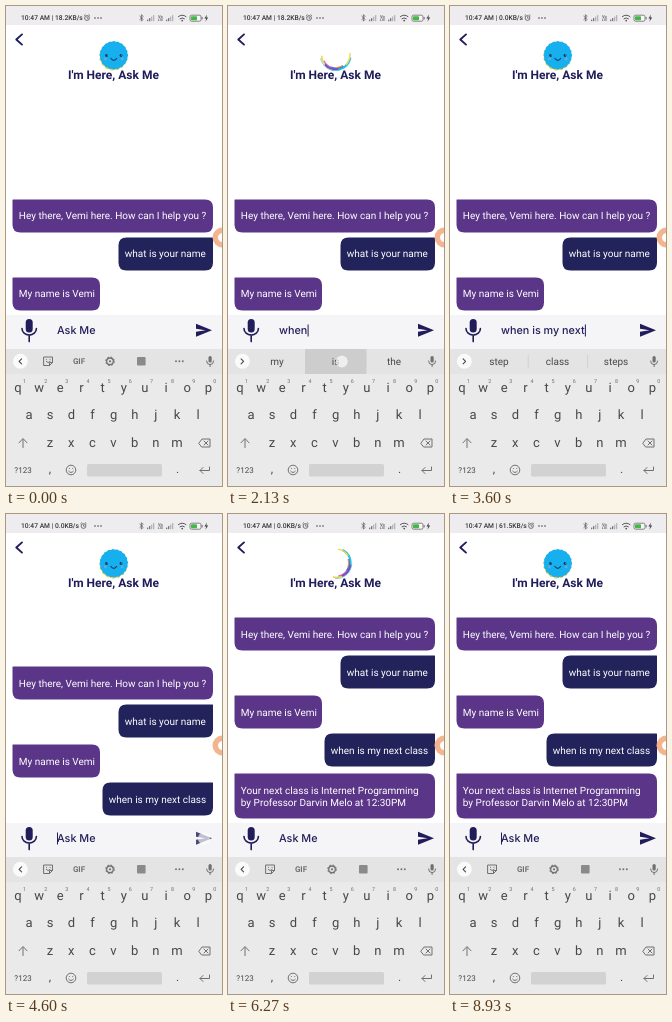
An HTML page that plays this animation: 216x480 px, repeating every 8.99 s.

```html
<!DOCTYPE html>
<html lang="en">
<head>
<meta charset="utf-8">
<title>Chat assistant</title>
<style>
  html, body { margin: 0; width: 100%; height: 100%; overflow: hidden; background: #fff; }
  svg { display: block; width: 100vw; height: 100vh; }
  text { font-family: Roboto, "Noto Sans", sans-serif; text-rendering: geometricPrecision; white-space: pre; }
  .field { font: 500 10.8px Inter, sans-serif; }
</style>
</head>
<body>
<svg id="stage" viewBox="0 0 216 480"></svg>
<script>
const LOOP = 8990;
const NAVY = '#201d5a', INK = '#484848', GREY = '#707070';
const stage = document.getElementById('stage');

function add(parent, tag, attrs = {}, text) {
  const el = document.createElementNS('http://www.w3.org/2000/svg', tag);
  for (const k in attrs) el.setAttribute(k, attrs[k]);
  if (text !== undefined) el.textContent = text;
  parent.append(el);
  return el;
}
const group = (parent = stage, attrs) => add(parent, 'g', attrs);
const rect = (p, x, y, width, height, fill, rx = 0) => add(p, 'rect', { x, y, width, height, fill, rx });
const dot = (p, cx, cy, r, fill) => add(p, 'circle', { cx, cy, r, fill });
const line = (p, d, stroke, w = 1) => add(p, 'path', {
  d, stroke, 'stroke-width': w, fill: 'none', 'stroke-linecap': 'round', 'stroke-linejoin': 'round' });
const shape = (p, d, fill) => add(p, 'path', { d, fill });
const label = (p, x, y, text, size, fill, anchor = 'start', weight = 400) => add(p, 'text', {
  x, y, 'font-size': size, fill, 'text-anchor': anchor, 'font-weight': weight }, text);
const show = (el, on) => el.setAttribute('opacity', +on);

// Value at time t of a list of [time, value] stops
function track(stops, t) {
  if (t <= stops[0][0]) return stops[0][1];
  for (let i = 1; i < stops.length; i++) {
    const [t0, a] = stops[i - 1], [t1, b] = stops[i];
    if (t < t1) return a + (b - a) * (t - t0) / (t1 - t0);
  }
  return stops[stops.length - 1][1];
}
// Last row whose start time has passed
const latest = (rows, t) => rows.reduce((r, row) => row[0] <= t ? row : r, rows[0]);

// ---- Chat ----
rect(stage, 0, 0, 216, 480, '#fff');
const chat = group();

function bubble(y, x0, x1, h, mine, lines) {
  const g = group(chat), r = 8, a = mine ? r : .5, b = mine ? .5 : r;
  shape(g, `M${x0 + a} ${y}H${x1 - b}q${b} 0 ${b} ${b}V${y + h - r}q0 ${r} ${-r} ${r}` +
    `H${x0 + r}q${-r} 0 ${-r} ${-r}V${y + a}q0 ${-a} ${a} ${-a}z`, mine ? '#21235a' : '#5b3688');
  const top = y + h / 2 + 3.5 - (lines.length - 1) * 6;
  lines.forEach((s, i) => label(g, x0 + 6.3, top + i * 12, s, 10, '#fff'));
  return g;
}
bubble(0, 6.5, 207, 33, false, ['Hey there, Vemi here. How can I help you ?']);
bubble(38, 112.5, 207, 33, true, ['what is your name']);
bubble(78, 6.5, 94, 33, false, ['My name is Vemi']);
const question = bubble(116, 96.5, 207, 33, true, ['when is my next class']);
const reply = bubble(156, 6.5, 207, 45, false,
  ['Your next class is Internet Programming', 'by Professor Darvin Melo at 12:30PM']);

// ---- Status bar and header ----
rect(stage, 0, 0, 216, 19, '#eeecef');
const speed = label(stage, 15, 14.2, '', 6.7, '#333', 'start', 500);
const alarm = group();
add(alarm, 'circle', { cx: 0, cy: 12, r: 2.4, fill: 'none', stroke: '#555', 'stroke-width': .8 });
line(alarm, 'M0 10.8V12.2H1M-2.8 9.6l1-.9M2.8 9.6l-1-.9', '#555', .7);
for (let i = 0; i < 3; i++) dot(stage, 89 + i * 3, 12, .8, '#444');
line(stage, 'M133.8 10.2l3.4 3.2-1.8 1.8V8.6l1.8 1.8-3.4 3.2', '#555', .7);
for (const x of [141, 160]) for (let i = 0; i < 4; i++)
  rect(stage, x + i * 2, 13.6 - i * 1.5, 1.3, 1.6 + i * 1.5, i < 2 ? '#777' : '#b5b3b6');
label(stage, 154.5, 11.5, 'Vo', 4, '#666', 'middle', 700);
label(stage, 154.5, 15.3, 'LTE', 3.5, '#666', 'middle', 700);
line(stage, 'M172.4 10.6q3.8-3 7.6 0M174 12.7q2.2-1.7 4.4 0', '#555', 1);
dot(stage, 176.2, 14.6, .9, '#555');
add(stage, 'rect', { x: 184, y: 9.2, width: 11, height: 6, rx: 1.6, fill: '#f6f6f6', stroke: '#666', 'stroke-width': .8 });
rect(stage, 185, 10.2, 6, 4, '#45b649', .8);
rect(stage, 195.7, 11, .9, 2.4, '#666');
shape(stage, 'M201 8.6l-2.6 4h1.8l-.8 3.2 2.8-4.2h-1.8z', '#444');
line(stage, 'M16 28.4L10.3 33.5L16 38.6', NAVY, 1.9);
label(stage, 107.4, 73.1, "I'm Here, Ask Me", 12, NAVY, 'middle', 700);

// ---- Mascot and its loading ring ----
const ball = group(), ring = group();
function fuzzy(r, bump, n) {
  let d = '';
  for (let i = 0; i < 120; i++) {
    const a = i * Math.PI / 60, q = r + bump * Math.cos(n * a);
    d += (i ? 'L' : 'M') + (q * Math.cos(a)).toFixed(2) + ' ' + (q * Math.sin(a)).toFixed(2);
  }
  return d + 'z';
}
const fur = group(ball);
shape(fur, fuzzy(13.7, .5, 15), '#e9cf4a').setAttribute('transform', 'translate(-.4 1.2)');
shape(fur, fuzzy(14, .3, 20), '#17b0ee');
for (const s of [-1, 1]) {
  dot(ball, s * 7.2, .2, 1.4, '#14335f');
  dot(ball, s * 7.2 + .5, -.3, .4, '#fff');
  dot(ball, s * 8.4, 3.6, 1.3, '#6fa8de');
}
line(ball, 'M-2.8 3.2Q0 6.8 2.8 3.2', '#14335f', 1.2);

// colour, start and length as shares of the sweep, radius, width
const arcs = [
  ['#29c0ec', .3, .6, 14.6, 2.2], ['#2f78dc', .35, .3, 13.2, 1.6], ['#f3cf45', 0, .28, 14.4, 1.5],
  ['#e765a8', .12, .25, 13.2, 1.2], ['#7a4fc4', .2, .32, 14.6, 2.4], ['#f39a3c', .45, .2, 12.6, 1],
  ['#f3d94f', .72, .28, 14, 1.4], ['#5fd6d0', .05, .5, 15.8, .8]
].map(([stroke, from, len, r, w]) => ({ from, len, el: add(ring, 'circle', {
  r, stroke, fill: 'none', 'stroke-width': w, pathLength: 360 }) }));

const SPINS = [350, 5000];
const MID = [[0, -190], [1270, 10], [1780, 84], [2530, 270], [3150, 420]];
const SWEEP = [[150, 10], [700, 120], [1270, 185], [1780, 185], [2530, 205], [3050, 30]];
const THICK = [[1780, 1], [2530, .6]];
const BALL = [[0, 1], [260, 0], [2820, 0], [3120, 1]];
const SWAY = [[0, 0], [70, 0], [130, 2], [330, 2], [3500, 0], [4070, 0], [4200, 5], [4330, 0],
  [4470, 0], [4600, -4], [4730, 0], [8670, 0], [8800, 5], [8930, 0]];

function drawMascot(t) {
  const p = t - latest(SPINS.map(s => [s]), t)[0];
  const size = track(BALL, p), mid = track(MID, p), sweep = track(SWEEP, p);
  ball.setAttribute('transform', `translate(107.8 49.3) scale(${size.toFixed(3)})`);
  fur.setAttribute('transform', `rotate(${track(SWAY, t).toFixed(2)})`);
  ring.setAttribute('transform', `translate(108 49) rotate(${(mid + sweep / 2).toFixed(1)}) scale(1 -1)`);
  ring.setAttribute('stroke-opacity', track(THICK, p));
  show(ring, p > 150 && p < 3050);
  for (const a of arcs) {
    const n = a.len * sweep;
    a.el.setAttribute('stroke-dasharray', `${n} ${360 - n}`);
    a.el.setAttribute('transform', `rotate(${a.from * sweep})`);
  }
}

// ---- Message field ----
rect(stage, 0, 309, 216, 34, '#f5f4f6');
rect(stage, 19.7, 313, 7, 13.5, NAVY, 3.5);
line(stage, 'M16 322.5a7.2 6.6 0 0 0 14.4 0M23.2 330V335.6', NAVY, 1.6);
const send = shape(stage, 'M190 317.8L206 324.3L190 330.8V325.8L199.5 324.3L190 322.8z', NAVY);
const field = add(stage, 'text', { x: 51, y: 328.4, class: 'field', fill: NAVY });
const caret = rect(stage, 51, 318.5, 1, 12, NAVY);

// ---- Keyboard ----
rect(stage, 0, 343, 216, 137, '#eaeaea');
rect(stage, 0, 343, 216, 25, '#e4e4e4');
const pressed = rect(stage, 77, 343, 61.5, 25, '#cdcdcd');
dot(stage, 14.4, 355.3, 7.5, '#fafafa');
const arrow = line(stage, 'M15.6 352.8l-2.5 2.5 2.5 2.5', INK, 1.1);

const tools = group();
line(tools, 'M38 351h8.5v5.5l-3 3H38zM46.5 356.5h-3v3M40.3 355.5q1.8 2.4 3.8 0M40.5 353.4h.1M44 353.4h.1', GREY, 1);
label(tools, 73, 358, 'GIF', 8, GREY, 'middle', 700);
add(tools, 'circle', { cx: 104, cy: 355.3, r: 3.3, fill: 'none', stroke: GREY, 'stroke-width': 1.3 });
add(tools, 'circle', { cx: 104, cy: 355.3, r: 4.3, fill: 'none', stroke: GREY, 'stroke-width': 1, 'stroke-dasharray': '1.8 1.58' });
dot(tools, 104, 355.3, 1.1, GREY);
rect(tools, 131, 351, 8.6, 8.6, '#8a8a8a', 1);
for (let i = 0; i < 3; i++) dot(tools, 170 + i * 3.4, 355.3, .95, GREY);

const hints = group();
const words = [49, 107.5, 166].map(x => label(hints, x, 358.8, '', 10, INK, 'middle'));
for (const x of [77.8, 137.4]) rect(hints, x, 349, .7, 13, '#cacaca');

rect(stage, 202.5, 350, 3.2, 6.6, GREY, 1.6);
line(stage, 'M200.6 355q0 3.6 3.5 3.6t3.5-3.6M204.1 358.6v2', GREY, 1);

const keyAt = {}, STEP = 21.15;
function keyRow(letters, x, y) {
  [...letters].forEach((c, i) => {
    keyAt[c] = [x + i * STEP, y];
    label(stage, x + i * STEP, y + 4, c, 13, INK, 'middle');
  });
}
keyRow('qwertyuiop', 12, 381.5);
keyRow('asdfghjkl', 23, 409.3);
keyRow('zxcvbnm', 44, 437);
[...'1234567890'].forEach((c, i) => label(stage, 18.5 + i * STEP, 377.3, c, 5.4, GREY, 'middle'));
line(stage, 'M17 441.5v-8M13 436.8l4-4.3 4 4.3', GREY, 1);
line(stage, 'M193 437l3-4h8v8h-8zM198 435l4 4M202 435l-4 4', GREY, 1);
label(stage, 17, 467, '?123', 8, INK, 'middle');
label(stage, 44, 467, ',', 12, INK, 'middle');
add(stage, 'circle', { cx: 65, cy: 464, r: 4.8, fill: 'none', stroke: GREY });
line(stage, 'M62.7 465.2q2.3 2.8 4.6 0M63.3 462.5h.1M66.7 462.5h.1', GREY, 1);
rect(stage, 81, 458, 75, 12.5, '#d2d2d2', 1.5);
label(stage, 171.5, 467, '.', 12, INK, 'middle');
line(stage, 'M203.5 461v3.5h-9.5M197 461.5l-3 3 3 3', GREY, 1);

const popup = group();
rect(popup, -10.5, -31, 21, 29, '#fff', 4);
const popupLetter = label(popup, 0, -11, '', 16, INK, 'middle');

// Screen-edge button and finger mark
dot(stage, 216.5, 231.5, 10, '#f3b490');
dot(stage, 216.5, 231.5, 4.5, '#fff');
const finger = dot(stage, 0, 0, 6, '#fff');

// ---- Script ----
// time, text in the field, suggestions
const EDITS = [
  [0, ''],
  [480, 'w', 'what we with'],
  [660, 'wh', 'what who why'],
  [860, 'whe', 'where when were'],
  [1040, 'when', 'my is the'],
  [2190, 'when is', 'the my it'],
  [2700, 'when is my', 'next new first'],
  [3250, 'when is my next', 'step class steps'],
  [4130, 'when is my next class', 'is in and'],
  [4560, '']
];
// start, end, key letter or suggestion slot or send
const TAPS = [
  [400, 500, 'w'], [590, 690, 'h'], [780, 880, 'e'], [970, 1070, 'n'],
  [2060, 2190, 1], [2570, 2700, 1], [3130, 3250, 0], [4000, 4130, 1], [4470, 4700, 'send']
];
const SPEEDS = [[0, '18.2KB/s', 81], [3330, '0.0KB/s', 77.5], [7070, '61.5KB/s', 81]];
const SCROLL = [[0, 193.4], [4560, 152.6], [5130, 103.6]];

function drawField(t) {
  const [since, text, list] = latest(EDITS, t);
  field.textContent = text || 'Ask Me';
  caret.setAttribute('x', text ? 51.3 + field.getComputedTextLength() : 51);
  const age = since ? t - since : t - 100;
  show(caret, age >= 0 && age % 1000 < 500);
  show(tools, !list);
  show(hints, !!list);
  if (list) list.split(' ').forEach((w, i) => { words[i].textContent = w; });
  arrow.setAttribute('transform', list ? 'translate(28.7 0) scale(-1 1)' : '');
}

function drawTap(t) {
  const tap = TAPS.find(([a, b]) => t >= a && t < b);
  const what = tap && tap[2], slot = typeof what === 'number', key = keyAt[what];
  show(pressed, slot);
  show(popup, !!key);
  send.setAttribute('opacity', what === 'send' ? .8 : 1);
  finger.setAttribute('opacity', tap ? .65 : 0);
  if (!tap) return;
  const [x, y] = key || (slot ? [55.3 + what * 58.5, 355.5] : [198, 324.5]);
  finger.setAttribute('cx', x);
  finger.setAttribute('cy', y);
  if (slot) pressed.setAttribute('x', 17.5 + what * 59.5);
  if (key) {
    popup.setAttribute('transform', `translate(${x} ${y})`);
    popupLetter.textContent = what;
  }
}

function draw(t) {
  const [, rate, alarmX] = latest(SPEEDS, t);
  speed.textContent = '10:47 AM | ' + rate;
  alarm.setAttribute('transform', `translate(${alarmX} 0)`);
  chat.setAttribute('transform', `translate(0 ${latest(SCROLL, t)[1]})`);
  show(question, t >= 4560);
  show(reply, t >= 5130);
  drawMascot(t);
  drawField(t);
  drawTap(t);
}

const start = performance.now();
function tick() {
  draw((performance.now() - start) % LOOP);
  requestAnimationFrame(tick);
}
tick();
</script>
</body>
</html>
```
